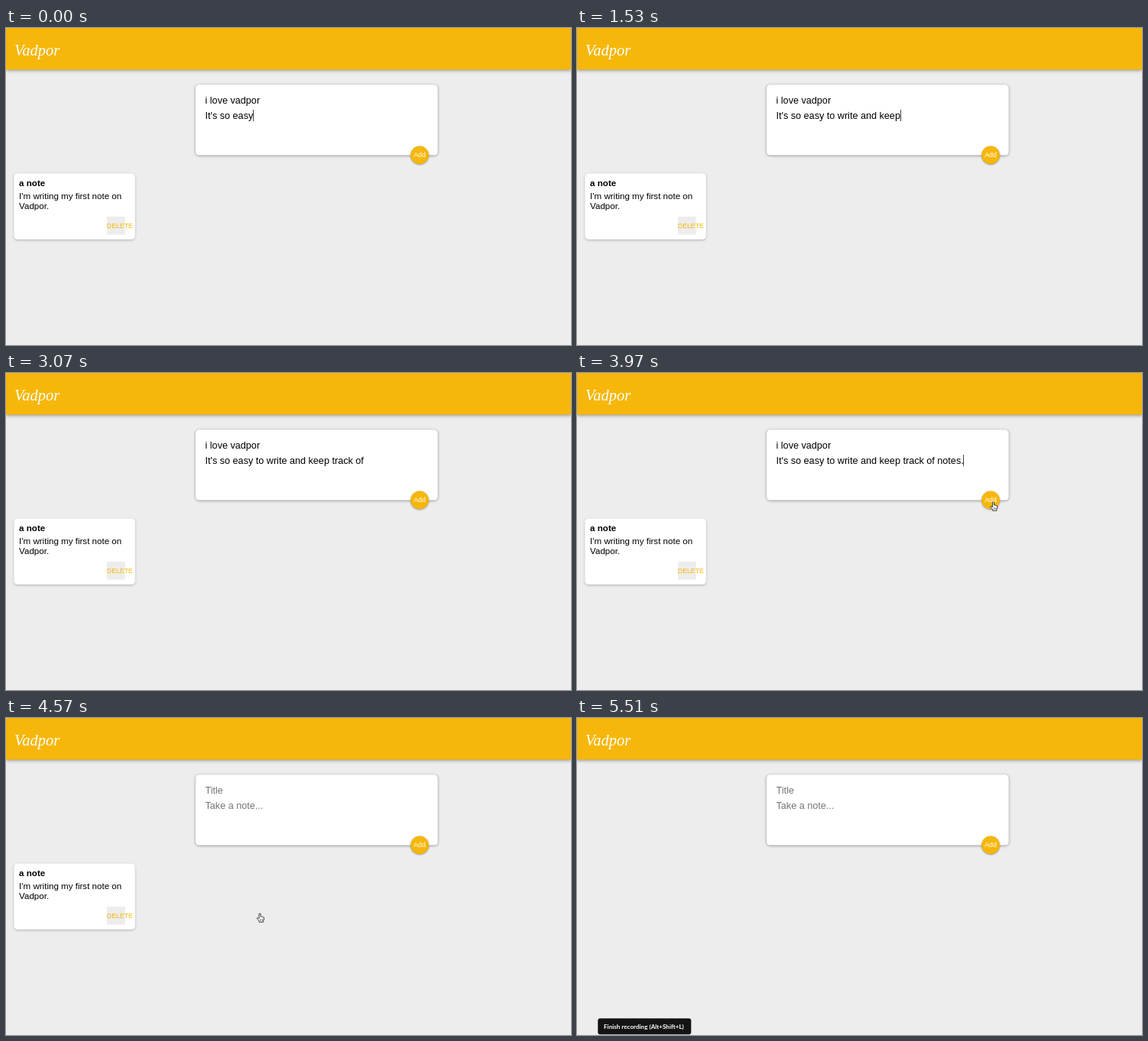
Recreate the animation shown at these times as an HTML page with a canvas. Size 739 px wide and 415 px high, loop 5.97 s.

```html
<!DOCTYPE html>
<html lang="en">
<head>
<meta charset="utf-8">
<title>Notes</title>
<style>
html, body { margin: 0; width: 100%; height: 100%; overflow: hidden; background: #ededed; }
canvas { display: block; width: 739px; height: 415px; }
</style>
</head>
<body>
<canvas id="stage"></canvas>
<script>
const W = 739, H = 415, LOOP = 5970;
const YELLOW = '#f6b70a', BLACK = '#000', HINT = '#757575';
const SANS = '"Liberation Sans", Arial, sans-serif';
const SERIF = '"Liberation Serif", serif';
const NAME = 'Vadpor';
const TITLE = 'i love ' + NAME.toLowerCase();
const BODY = "It's so easy to write and keep track of notes.";
const ADDED = 4090, SECOND_GONE = 4540, FIRST_GONE = 5010, TOAST = 5400;

// [time, letters typed]
const TYPING = [[0, 12], [50, 12], [580, 19], [700, 19], [960, 24], [1000, 24], [1270, 29],
  [1840, 32], [2120, 36], [2180, 36], [2470, 40], [3080, 40], [3470, 46]];

// [time, x, y] of the pointer tip
const POINTER = [[3640, 440, 173], [3900, 544.5, 169], [4210, 544.5, 169], [4340, 366, 280],
  [4410, 332, 256], [4670, 332, 256], [4900, 152, 258], [5170, 152, 258], [5420, 60, 418]];

const canvas = document.getElementById('stage');
const ctx = canvas.getContext('2d');
const dpr = window.devicePixelRatio || 1;
canvas.width = Math.round(W * dpr);
canvas.height = Math.round(H * dpr);

const smooth = k => k * k * (3 - 2 * k);

function sample(keys, t, i, ease = k => k) {
  if (t <= keys[0][0]) return keys[0][i];
  for (let n = 1; n < keys.length; n++) {
    const a = keys[n - 1], b = keys[n];
    if (t < b[0]) return a[i] + (b[i] - a[i]) * ease((t - a[0]) / (b[0] - a[0]));
  }
  return keys[keys.length - 1][i];
}

function text(str, x, y, font, color = BLACK, align = 'left') {
  ctx.font = font;
  ctx.fillStyle = color;
  ctx.textAlign = align;
  ctx.fillText(str, x, y);
}

function box(x, y, w, h, r, fill, shadow, dy = 0, blur = 0) {
  ctx.save();
  if (shadow) {
    ctx.shadowColor = shadow;
    ctx.shadowOffsetY = dy * dpr;
    ctx.shadowBlur = blur * dpr;
  }
  ctx.fillStyle = fill;
  ctx.beginPath();
  ctx.roundRect(x, y, w, h, r);
  ctx.fill();
  ctx.restore();
}

function header() {
  box(0, -10, W, 64.5, 0, YELLOW, 'rgba(0,0,0,.35)', 1.3, 4);
  text(NAME, 11, 36, `italic 20.5px ${SERIF}`, '#fff');
}

function form(t) {
  const font = `12.64px ${SANS}`, x = 260.5;
  box(248, 74.3, 316.7, 92.2, 4.6, '#fff', 'rgb(138,137,137)', 0.7, 3.5);
  if (t < ADDED) {
    const typed = BODY.slice(0, Math.floor(sample(TYPING, t, 1)));
    text(TITLE, x, 99, font);
    text(typed, x, 119, font);
    const blinkOff = t >= 2970 && t < 3140;
    if (!blinkOff) {
      ctx.fillStyle = 'rgba(0,0,0,.75)';
      ctx.fillRect(Math.round(x + ctx.measureText(typed).width - 0.3), 107, 1, 15);
    }
  } else {
    text('Title', x, 99, font, HINT);
    text('Take a note...', x, 119, font, HINT);
  }
  box(529.2, 154.6, 23.7, 23.7, 11.85, YELLOW, 'rgba(0,0,0,.4)', 0.7, 2.2);
  text('Add', 541, 169.4, `8.77px ${SANS}`, '#fff', 'center');
}

function note(x, title, lines) {
  box(x, 190.4, 158.4, 86.4, 4.6, '#fff', 'rgba(0,0,0,.24)', 1.1, 3.3);
  text(title, x + 6.7, 207, `bold 11.58px ${SANS}`);
  lines.forEach((line, i) => text(line, x + 6.7, 224 + i * 13.2, `11.58px ${SANS}`));
  box(x + 121.6, 246.8, 23.7, 23.7, 0, '#ededed');
  text('DELETE', x + 121.4, 261.6, `8.77px ${SANS}`, YELLOW);
}

const hand = new Path2D('M-1 .8Q-1-.2 0-.2Q1-.2 1 .8V4Q2 3.4 2.6 4.3Q3.6 3.9 4.1 4.8Q5.4 4.5 5.5 5.8' +
  'Q5.6 8.4 4.3 9.7V11.2H-.8V10Q-2.4 8.4-3.6 6.5Q-3.7 5.2-2.4 5.5L-1 6.6Z');
const arrow = new Path2D('M0 0V10.2L2.4 8L4 11.6L5.6 10.9L4.1 7.4H7.2Z');

function pointer(t) {
  if (t < POINTER[0][0] || t > 5420) return;
  const onButton = (t > 3870 && t < 4230) || (t > 4390 && t < 4700) || (t > 4870 && t < 5190);
  const shape = onButton ? hand : arrow;
  ctx.save();
  ctx.translate(sample(POINTER, t, 1, smooth), sample(POINTER, t, 2, smooth));
  ctx.fillStyle = onButton ? '#fff' : '#111';
  ctx.strokeStyle = onButton ? '#222' : '#fff';
  ctx.lineWidth = 0.9;
  ctx.lineJoin = 'round';
  ctx.fill(shape);
  ctx.stroke(shape);
  if (onButton) {
    ctx.lineWidth = 0.6;
    ctx.stroke(new Path2D('M.4 7.3V9.6M2 7.3V9.6M3.6 7.3V9.6'));
  }
  ctx.restore();
}

function toast(t) {
  if (t < TOAST) return;
  ctx.globalAlpha = Math.min(1, (t - TOAST) / 100);
  box(27.3, 393.3, 122, 21, 3, '#141414');
  text('Finish recording (Alt+Shift+L)', 35, 406.6, 'bold 8.1px Lato, sans-serif', '#fff');
  ctx.globalAlpha = 1;
}

function draw(t) {
  ctx.setTransform(dpr, 0, 0, dpr, 0, 0);
  ctx.fillStyle = '#ededed';
  ctx.fillRect(0, 0, W, H);
  header();
  form(t);
  if (t < FIRST_GONE) note(10.4, 'a note', ["I'm writing my first note on", NAME + '.']);
  if (t >= ADDED && t < SECOND_GONE) {
    note(189.8, TITLE, [BODY.slice(0, 25), BODY.slice(26)]);
  }
  pointer(t);
  toast(t);
}

const start = performance.now();
function tick() {
  draw((performance.now() - start) % LOOP);
  requestAnimationFrame(tick);
}
tick();
</script>
</body>
</html>
```
